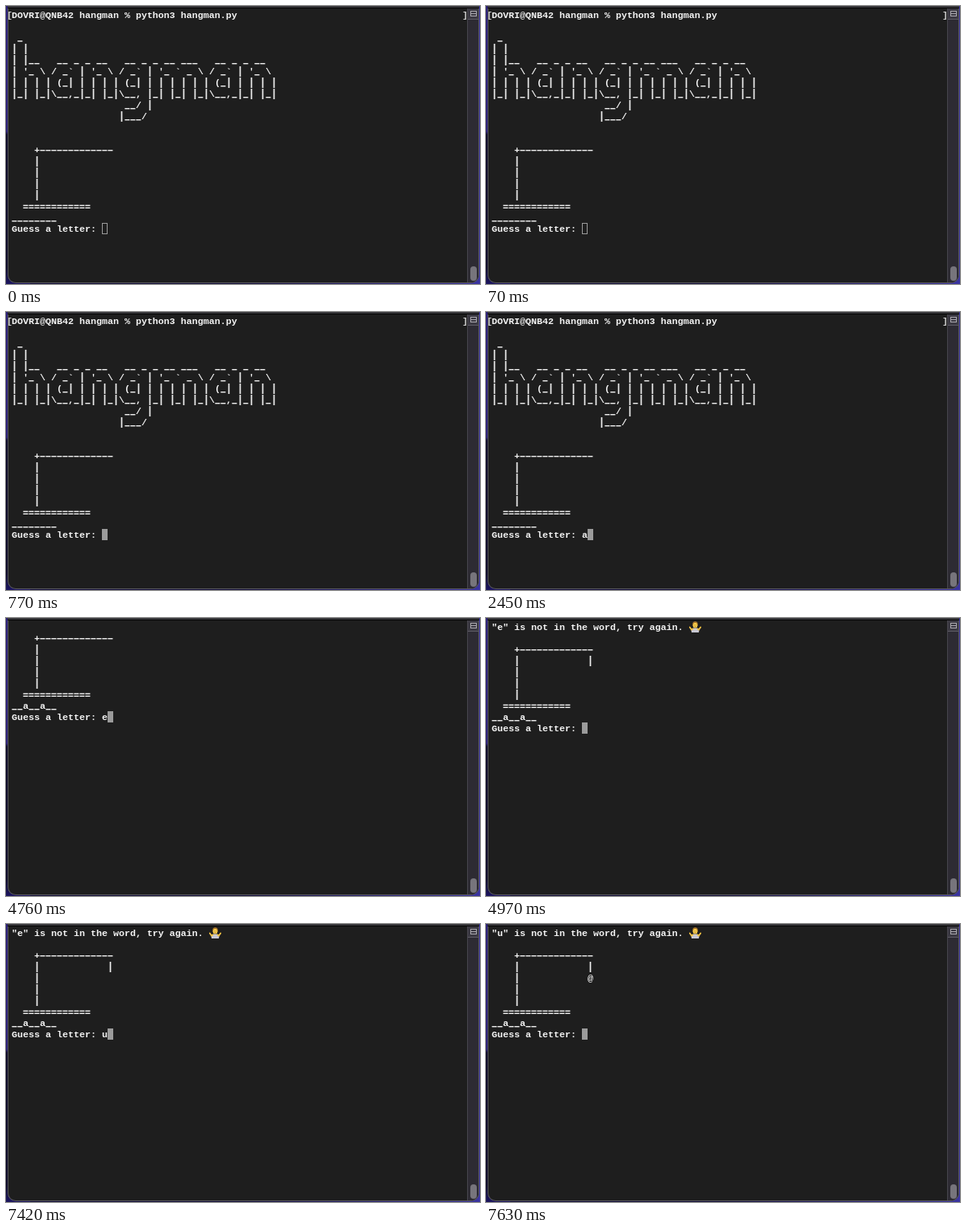
Write an HTML page that moves like this. It is 588 px wide and 346 px high and loops after 8 s.

```html
<!DOCTYPE html>
<html lang="en">
<head>
<meta charset="utf-8">
<title>Hangman in a terminal</title>
<style>
html, body { margin: 0; width: 100%; height: 100%; overflow: hidden; background: #15103c; }
#stage {
  position: relative; width: 588px; height: 346px; overflow: hidden;
  background:
    linear-gradient(#2a1f78 0 156px, #0d0a28 160px 325px, #1c1560) 0 0 / 30px 100% no-repeat,
    linear-gradient(90deg, #120d38 0 50%, #3a34a0);
  font: bold 11.6667px/14px "Liberation Mono", "DejaVu Sans Mono", monospace;
  color: #f4f4f4;
}
#stage * { box-sizing: border-box; }
#stage > *, .scroll * { position: absolute; }

.window {
  left: 2px; top: 0; width: 585px; height: 345px; overflow: hidden;
  background: #1e1e1e; border: solid #58575d; border-width: 0 1px 1px;
  border-radius: 0 0 10px 10px;
}
.title { left: 2px; top: 0; width: 585px; height: 3px; background: #39383c; border-bottom: 1px solid #060606; }
.scroll {
  left: 572px; top: 3px; width: 14px; height: 341px;
  background: #2d2b33; border-left: 1px solid #47454d; border-radius: 0 0 9px 0;
}
.split { left: 0; top: 0; width: 13px; height: 14px; background: #3b3942; border-bottom: 1px solid #5c5a63; }
.split i { left: 3px; top: 3px; width: 8px; height: 7px; border: 1px solid #aaa8ae; }
.split i::after { content: ""; position: absolute; left: 0; top: 2px; width: 6px; height: 1px; background: #aaa8ae; }
.thumb { left: 3px; top: 321px; width: 8px; height: 18px; border-radius: 4px; background: #77757c; }

pre { margin: 0; left: 7px; top: 5px; font: inherit; white-space: pre; }
.mark { top: 5px; color: #d0d0d0; }

/* line characters, drawn per 7px cell */
.line {
  --bar: linear-gradient(90deg, #aaa 1px, #eee 1px 6px, #777 6px);
  --soft: linear-gradient(90deg, #555 1px, #777 1px 6px, #444 6px);
  display: inline-block; height: 14px; vertical-align: top;
  color: transparent; background-size: 7px 1px; background-repeat: repeat-x;
}
.under { background-image: var(--bar), var(--soft); background-position: 0 10px, 0 11px; }
.dash { background-image: var(--bar), var(--soft); background-position: 0 6px, 0 7px; }
.equal {
  background-image: var(--soft), var(--bar), var(--soft), var(--bar);
  background-position: 0 4px, 0 5px, 0 7px, 0 8px;
}
.pipe {
  background-image: linear-gradient(90deg, #0000 2px, #666 2px 3px, #eee 3px 4px, #666 4px 5px, #0000 5px);
  background-size: 7px 13px;
}

.cursor {
  left: 119px; top: 270px; width: 7px; height: 14px;
  border: 1px solid #9b9b9b; animation: cursor 8s step-end infinite;
}
@keyframes cursor {
  0% { background: #0000; transform: none; }
  8.75% { background: #9b9b9b; transform: none; }
  30.625% { background: #9b9b9b; transform: translate(7px, 0); }
  35.875% { background: #9b9b9b; transform: translate(0, -154px); }
  59.5% { background: #9b9b9b; transform: translate(7px, -154px); }
  62.125% { background: #9b9b9b; transform: translate(0, -140px); }
  92.75% { background: #9b9b9b; transform: translate(7px, -140px); }
  95.375%, 100% { background: #9b9b9b; transform: translate(0, -140px); }
}

.start { animation: start 8s step-end infinite; }
.hit { animation: hit 8s step-end infinite; }
.miss { animation: miss 8s step-end infinite; }
.miss1 { animation: miss1 8s step-end infinite; }
.miss2 { animation: miss2 8s step-end infinite; }
.key { left: 119px; }
.key-a { top: 271px; animation: key-a 8s step-end infinite; }
.key-e { top: 117px; animation: key-e 8s step-end infinite; }
.key-u { top: 131px; animation: key-u 8s step-end infinite; }
@keyframes start { 0% { visibility: visible; } 35.875%, 100% { visibility: hidden; } }
@keyframes hit { 0% { visibility: hidden; } 35.875% { visibility: visible; } 62.125%, 100% { visibility: hidden; } }
@keyframes miss { 0% { visibility: hidden; } 62.125%, 100% { visibility: visible; } }
@keyframes miss1 { 0% { visibility: hidden; } 62.125% { visibility: visible; } 95.375%, 100% { visibility: hidden; } }
@keyframes miss2 { 0% { visibility: hidden; } 95.375%, 100% { visibility: visible; } }
@keyframes key-a { 0% { visibility: hidden; } 30.625% { visibility: visible; } 35.875%, 100% { visibility: hidden; } }
@keyframes key-e { 0% { visibility: hidden; } 59.5% { visibility: visible; } 62.125%, 100% { visibility: hidden; } }
@keyframes key-u { 0% { visibility: hidden; } 92.75% { visibility: visible; } 95.375%, 100% { visibility: hidden; } }
</style>
</head>
<body>
<div id="stage">
<div class="window"></div>
<div class="title"></div>
<div class="scroll"><div class="split"><i></i></div><div class="thumb"></div></div>

<span class="mark start" style="left:1px">[</span>
<span class="mark start" style="left:566px">]</span>
<pre class="start">
DOVRI@QNB42 hangman % python3 hangman.py

 _
| |
| |__   __ _ _ __   __ _ _ __ ___   __ _ _ __
| '_ \ / _` | '_ \ / _` | '_ ` _ \ / _` | '_ \
| | | | (_| | | | | (_| | | | | | | (_| | | | |
|_| |_|\__,_|_| |_|\__, |_| |_| |_|\__,_|_| |_|
                    __/ |
                   |___/


    +-------------
    |
    |
    |
    |
  ============
________
Guess a letter:</pre>

<pre class="hit" style="top:19px">
    +-------------
    |
    |
    |
    |
  ============
__a__a__
Guess a letter:</pre>

<pre class="miss">
" " is not in the word, try again.

    +-------------
    |            |
    |
    |
    |
  ============
__a__a__
Guess a letter:</pre>
<span class="miss1" style="left:14px;top:5px">e</span>
<span class="miss2" style="left:14px;top:5px">u</span>
<span class="miss2" style="left:126px;top:61px">@</span>

<svg class="miss" style="left:252px;top:4px" width="15" height="14" viewBox="0 0 15 14">
  <path d="M3 14 2.5 10.5 5 8.5h5l2.5 2L12 14z" fill="#c9c8d2"/>
  <path d="M.8 7.5 3 10.5 4.5 9.5M14.2 7.5 12 10.5 10.5 9.5" fill="none" stroke="#f5c242" stroke-width="1.8" stroke-linecap="round"/>
  <ellipse cx="7.5" cy="4" rx="3.3" ry="3.7" fill="#a8742a"/>
  <ellipse cx="7.5" cy="5.2" rx="2.7" ry="3.3" fill="#fbd04c"/>
  <path d="M6.2 4.8h.8M8.2 4.8h.8M6.6 7h1.8" stroke="#6b4718" stroke-width=".7"/>
</svg>

<span class="key key-a">a</span>
<span class="key key-e">e</span>
<span class="key key-u">u</span>
<div class="cursor"></div>
</div>
<script>
const kinds = { "_": "under", "|": "pipe", "-": "dash", "=": "equal" };
for (const pre of document.querySelectorAll("pre")) {
  pre.innerHTML = pre.textContent.replace(/_+|\|+|-+|=+/g,
    run => `<span class="line ${kinds[run[0]]}">${run}</span>`);
}
</script>
</body>
</html>
```
